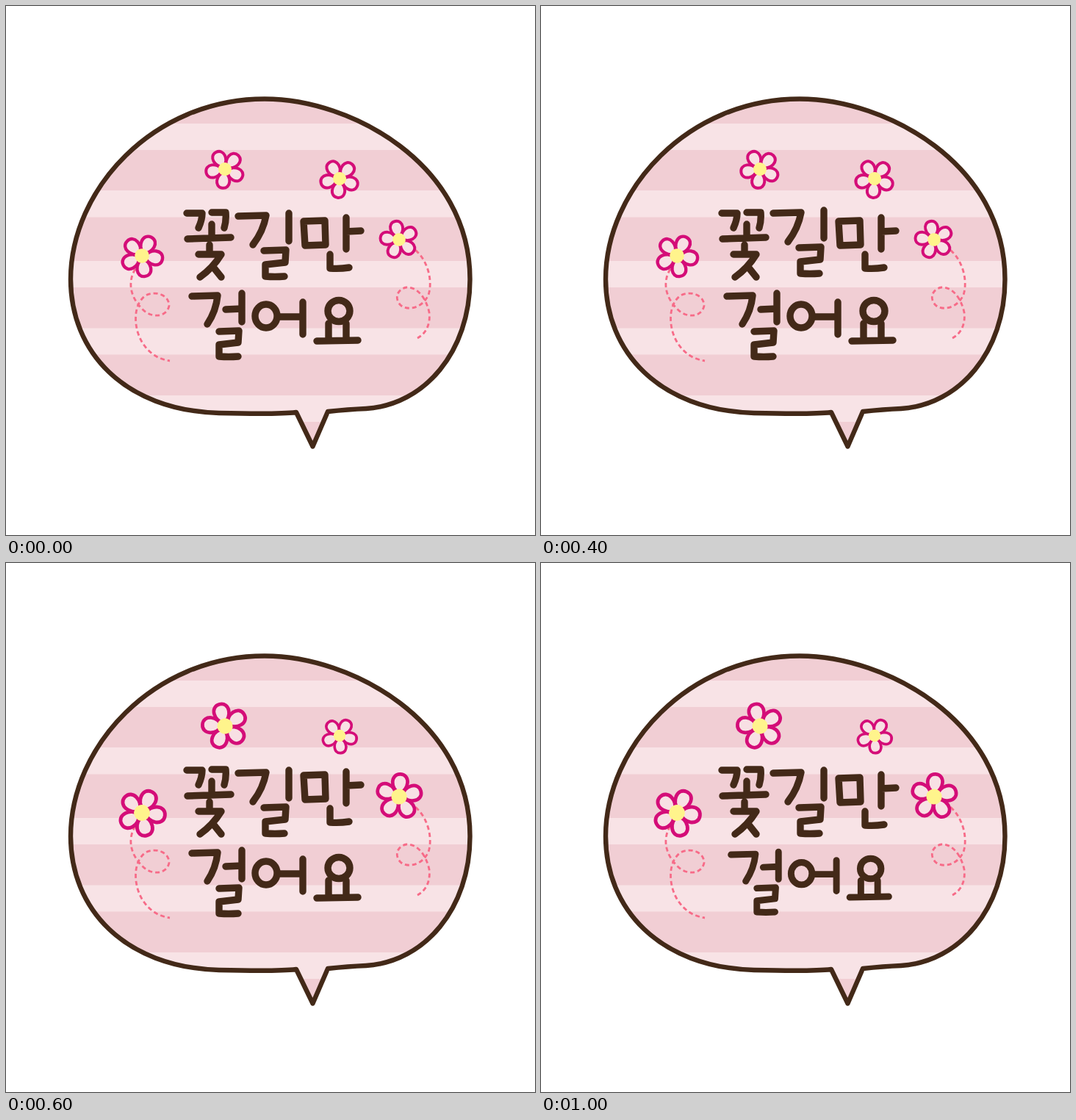
Write an HTML page that moves like this. It is 720 px wide and 720 px high and loops after 1200 ms.

```html
<!DOCTYPE html>
<html lang="ko">
<head>
<meta charset="utf-8">
<style>
  html, body { margin: 0; width: 100%; height: 100%; overflow: hidden; background: #fff; }
  svg { display: block; width: 100%; height: 100%; }
  .lettering, .outline { fill: none; stroke: #432918; stroke-linecap: round; stroke-linejoin: round; }
  .lettering { stroke-width: 9.4; }
  .outline { stroke-width: 6.4; }
  .trail { fill: none; stroke: #f76b88; stroke-width: 2.8; stroke-dasharray: 6 4; }
  .petal { fill: #f8e0e4; stroke: #d40d78; stroke-width: 4; stroke-linejoin: round; }
  .heart { fill: #fff48c; }
</style>
</head>
<body>
<svg viewBox="0 0 720 720" role="img" aria-label="꽃길만 걸어요">
  <defs>
    <path id="bubble" d="M352 126.5C470 126.5 631.5 215 631.5 372C631.5 470 570 543 490 548Q466 549 438 552L417.5 599.5L395 553C370 556 330 555 290 554C160 550 88 470 88 372C88 250 200 126.5 352 126.5Z"/>
    <clipPath id="inside"><use href="#bubble"/></clipPath>
    <g id="flower">
      <g id="petals" class="petal"></g>
      <circle class="heart" r="9"/>
    </g>
  </defs>
  <g clip-path="url(#inside)">
    <rect width="720" height="720" fill="#f1ced4"/>
    <path fill="#f8e3e6" d="M0 160H720V196H0ZM0 251H720V287.5H0ZM0 347H720V383H0ZM0 438.5H720V474.5H0ZM0 530H720V566H0Z"/>
  </g>
  <use href="#bubble" class="outline"/>
  <path class="trail" d="M176 358C166 374 168 394 184 411C197 426 219 424 222 408C222 393 204 387 190 394C176 404 174 425 179 443C185 464 201 480 223 483"/>
  <path class="trail" d="M549 327C572 338 582 372 575 393C567 411 548 415 538 408C527 398 533 385 545 383C560 382 572 398 576 417C578 432 572 446 560 452"/>
  <g id="flowers"></g>
  <g class="lettering">
    <path class="hop" d="M246 282H267Q267 291 262 302M280 281H299Q300 292 297 302M280 297V314M247 317L306 315M277 325V333M262 338L293 338Q282 356 264 369M281 354L293 369"/>
    <path class="hop" d="M316 286L354 285Q350 307 336 325M385 282V320M351 333L381 332L380 349L353 352V368Q366 369 379 368"/>
    <path class="hop" d="M405 293L434 292L435 325L407 326ZM463 288V331M463 307L483 306M441 338V357Q454 358 467 356"/>
    <g id="line2">
      <path d="M253 395L288 394Q286 415 274 433M321 391V430M299 413L321 412M290 443L317 442L316 458L290 461V477Q303 478 316 477"/>
      <path d="M373 423H403M404 403V447"/>
      <ellipse cx="354" cy="422" rx="15" ry="16"/>
      <ellipse cx="453" cy="415" rx="15" ry="14.5"/>
      <path d="M439 432V455M463 432V455M423 456L479 455"/>
    </g>
  </g>
</svg>
<script>
const $ = id => document.getElementById(id);
const STEP = 200, STEPS = 6;

// x, y, then [reach, angle] for each of the two poses
const blooms = [
  [298, 222, [28, -118], [33, -104]],
  [454, 235, [28, -121], [25.5, -130]],
  [185, 340, [30.5, -63], [34, -65]],
  [535, 318, [27.5, -102], [33, -86]]
];

for (let i = 0; i < 5; i++)
  $("petals").innerHTML += `<path transform="rotate(${i * 72})" d="M4 0C8 -11 26 -12 26 0C26 12 8 11 4 0Z"/>`;
$("flowers").innerHTML = '<use href="#flower"/>'.repeat(blooms.length);
const flowers = [...$("flowers").children];
const hops = document.querySelectorAll(".hop");

function draw(time) {
  const step = Math.floor(time / STEP) % STEPS;
  blooms.forEach(([x, y, ...poses], i) => {
    const [reach, angle] = poses[step % 2];
    flowers[i].setAttribute("transform", `translate(${x} ${y}) rotate(${angle}) scale(${reach / 28})`);
  });
  hops.forEach((hop, i) => hop.setAttribute("transform", `translate(0 ${step === i + 1 ? -4 : 0})`));
  const size = step === 5 ? 0.95 : 1;
  $("line2").setAttribute("transform", `translate(366 436) scale(${size}) translate(-366 -436)`);
}

const start = performance.now();
function tick() {
  draw(performance.now() - start);
  requestAnimationFrame(tick);
}
tick();
</script>
</body>
</html>
```
